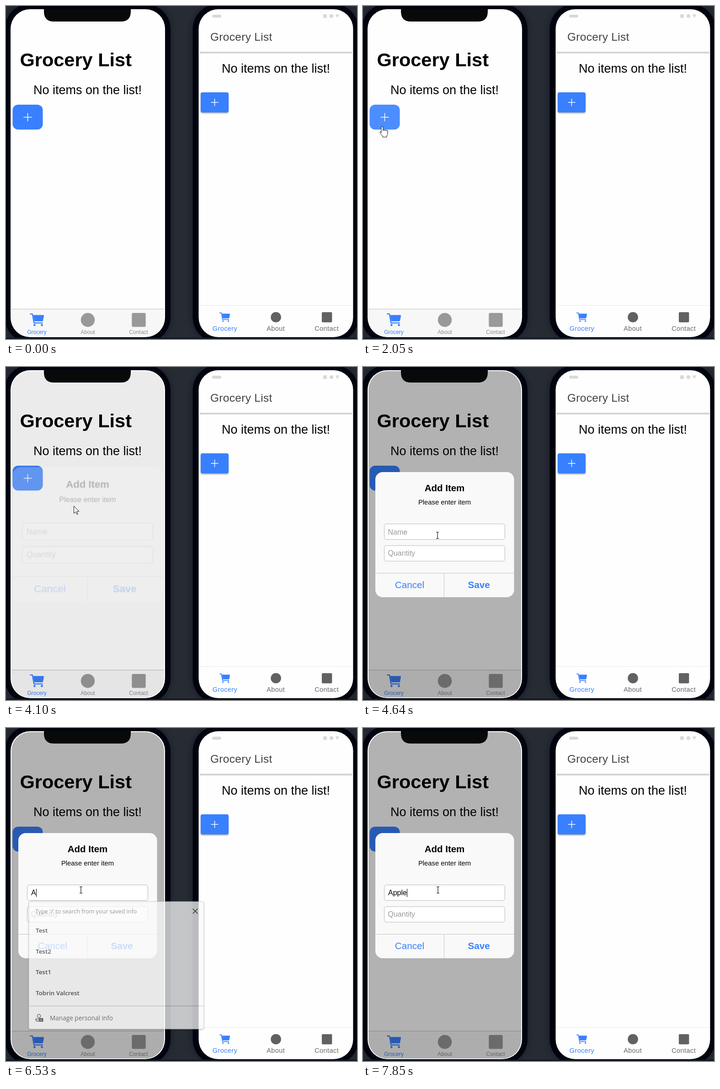
Animation of 768x729 px, one loop 8 s. Source, as an HTML page:

```html
<!DOCTYPE html>
<html lang="en">
<head>
<meta charset="utf-8">
<title>Grocery list on two phones</title>
<style>
  html, body { margin: 0; width: 100%; height: 100%; overflow: hidden; background: #262b34; }
  body { position: relative; font-family: "Liberation Sans", Arial, sans-serif; }
  svg { position: absolute; left: 0; top: 0; display: block; }
  .mid { text-anchor: middle; }
  .blue { fill: #3880ff; }
  .bold { font-weight: 700; }
  .message { font-size: 27px; text-anchor: middle; }
  .plus { stroke: #fff; stroke-width: 1.5; stroke-linecap: round; }
  .ios-tab { font-size: 12px; text-anchor: middle; }
  .md-tab { font-size: 14.5px; letter-spacing: .03em; text-anchor: middle; }
  .field { fill: #fff; stroke: #b8b8b8; }
  .hint { font-size: 16px; fill: #999; }
  .action { font-size: 20.7px; fill: #3880ff; text-anchor: middle; }
  .popup { font-family: "Open Sans", "Noto Sans", sans-serif; }
  .saved { font-size: 13.4px; font-weight: 600; fill: #303030; }

  /* One shared 8 s clock; 1% is 80 ms. */
  .anim { animation: 8s step-end infinite; }
  .hover { animation-name: hover; }
  .click { animation-name: click; }
  .backdrop { animation-name: backdrop; }
  .alert { animation-name: alert; transform-origin: 178.5px 367px; }
  .name-hint { animation-name: name-hint; }
  .popup { animation-name: popup; }
  .cursor { animation-name: cursor; }
  .arrow { animation-name: arrow; }
  .hand { animation-name: hand; }
  .beam { animation-name: beam; }

  .typed {
    position: absolute; left: 55px; top: 352px;
    font-size: 16px; line-height: 18px; color: #000;
  }
  .typed::after {
    content: ""; display: block; height: 18px; width: fit-content;
    border-right: 1px solid transparent;
    animation: type 8s step-end infinite, caret 8s step-end infinite;
  }

  @keyframes hover { 0%, 48.18% { fill: #3880ff } 23.7% { fill: #4c8dff } 100% { fill: #3880ff } }
  @keyframes click { 0%, 45.375%, 100% { opacity: 0 } 44.625% { opacity: .56 } }
  @keyframes backdrop {
    0% { opacity: 0 } 51.25% { opacity: .075 } 52.2% { opacity: .235 } 53.1%, 100% { opacity: .3 }
  }
  @keyframes alert {
    0% { opacity: 0; transform: scale(1.1) }
    51.25% { opacity: .23; transform: scale(1.08) }
    52.2% { opacity: .78; transform: scale(1.022) }
    53.1%, 100% { opacity: 1; transform: scale(1) }
  }
  @keyframes name-hint { 0% { opacity: 1 } 80.625%, 100% { opacity: 0 } }
  @keyframes popup {
    0% { opacity: 0 } 66.75% { opacity: .5 } 67.75% { opacity: 1 }
    81.625% { opacity: .75 } 82.6% { opacity: .3 } 83.5%, 100% { opacity: 0 }
  }
  @keyframes type {
    0% { content: "" } 80.625% { content: "A" } 88.375% { content: "Ap" }
    89.5% { content: "App" } 95.125% { content: "Appl" } 98.125%, 100% { content: "Apple" }
  }
  @keyframes caret {
    0%, 73.875% { border-color: transparent } 66.75%, 80.625%, 100% { border-color: #000 }
  }
  @keyframes cursor {
    0% { transform: translate(503px, 740px) }
    8% { transform: translate(503px, 715px); animation-timing-function: steps(10) }
    17.875% { transform: translate(160px, 279px); animation-timing-function: steps(8) }
    25.625% { transform: translate(42px, 264px) }
    27.5% { transform: translate(42px, 265px) }
    28.7% { transform: translate(42px, 265px); animation-timing-function: steps(3) }
    31.875% { transform: translate(53px, 240px) }
    46.125% { transform: translate(53px, 240px); animation-timing-function: steps(5) }
    51.25% { transform: translate(148px, 304px); animation-timing-function: steps(6) }
    56.875% { transform: translate(171px, 374px) }
    58% { transform: translate(163px, 368px); animation-timing-function: steps(2) }
    60.125% { transform: translate(161px, 369px) }
    60.75% { transform: translate(161px, 369px); animation-timing-function: steps(3) }
    64.125% { transform: translate(158px, 364px) }
    69.125% { transform: translate(158px, 364px); animation-timing-function: steps(2) }
    70.625%, 100% { transform: translate(164px, 354px) }
  }
  @keyframes arrow { 0%, 23.7%, 54.99%, 100% { opacity: 0 } 8%, 48.18% { opacity: 1 } }
  @keyframes hand { 0%, 48.18%, 100% { opacity: 0 } 23.7% { opacity: 1 } }
  @keyframes beam { 0% { opacity: 0 } 54.99%, 100% { opacity: 1 } }
</style>
</head>
<body>
<svg width="768" height="729" viewBox="0 0 768 729">
  <defs>
    <clipPath id="ios-app"><rect x="12" y="9" width="334" height="714.5" rx="41"/></clipPath>
    <clipPath id="md-app"><rect x="422" y="7" width="337" height="718" rx="43"/></clipPath>
    <filter id="glow" x="-10%" y="-10%" width="120%" height="120%"><feGaussianBlur stdDeviation="7"/></filter>
    <linearGradient id="fall" x2="0" y2="1">
      <stop stop-color="#000" stop-opacity=".26"/>
      <stop offset="1" stop-color="#000" stop-opacity="0"/>
    </linearGradient>
    <g id="cart">
      <path d="M48 80h64l48 272h256" fill="none" stroke="#3880ff" stroke-width="32" stroke-linecap="round" stroke-linejoin="round"/>
      <path class="blue" d="M134 112H440q25 2 22 28l-29 145q-4 19-24 19H168z"/>
      <circle class="blue" cx="176" cy="416" r="32"/>
      <circle class="blue" cx="400" cy="416" r="32"/>
    </g>
    <g id="phone">
      <rect x="-4" y="-5" width="364" height="742" rx="56" fill="#000" opacity=".35" filter="url(#glow)"/>
      <rect x="-3" y="-5" width="363" height="742" rx="56" fill="#01040f"/>
      <rect x="10" y="7" width="338" height="718" rx="43" fill="#fefefe"/>
    </g>
  </defs>

  <rect width="768" height="729" fill="#262b34"/>
  <use href="#phone"/>
  <use href="#phone" x="411.5"/>
  <rect y="726" width="768" height="3" fill="#101721"/>

  <!-- Left phone -->
  <g clip-path="url(#ios-app)">
    <text class="bold" x="30.5" y="132" font-size="41.5">Grocery List</text>
    <text class="message" x="178.5" y="193">No items on the list!</text>
    <rect class="anim hover" x="14.5" y="216" width="66" height="54.5" rx="12"/>
    <path class="plus" d="M39 243.5h17M47.5 235v17"/>
    <rect x="12" y="663" width="334" height="62" fill="#f7f7f7"/>
    <path d="M12 663.5h334" stroke="#bcbcbc"/>
    <use href="#cart" transform="translate(49.7 668.4) scale(.0721)"/>
    <circle cx="179" cy="687.3" r="15.2" fill="#999"/>
    <rect x="275.3" y="672" width="30.4" height="30.6" rx="3" fill="#999"/>
    <text class="ios-tab blue" x="67.5" y="718">Grocery</text>
    <g class="ios-tab" fill="#8c8c8c">
      <text x="179" y="718">About</text>
      <text x="290" y="718">Contact</text>
    </g>
    <rect class="anim backdrop" x="12" y="9" width="334" height="716"/>
  </g>
  <path d="M83 6h190v6q0 22-22 22H105q-22 0-22-22z" fill="#08090b"/>

  <!-- Right phone -->
  <g clip-path="url(#md-app)">
    <g fill="#d9d9d9">
      <rect x="451" y="19" width="20" height="6.6" rx="3.3"/>
      <rect x="694" y="18.2" width="8" height="8" rx="1"/>
      <circle cx="712" cy="22.2" r="4.1"/>
      <path d="M720.7 18.5h8.6l-4.3 7.7z"/>
    </g>
    <text x="447" y="76" font-size="24.5" letter-spacing=".3" fill="#424242">Grocery List</text>
    <rect x="423.5" y="100.5" width="334" height="5" fill="url(#fall)"/>
    <text class="message" x="590.5" y="145.5">No items on the list!</text>
    <rect class="blue" x="426" y="189" width="61" height="44" rx="4" style="filter: drop-shadow(0 2px 1.5px #0005)"/>
    <path class="plus" d="M449 211h15M456.5 203.5v15"/>
    <path d="M423 655.5h335" stroke="#e8e8e8"/>
    <use href="#cart" transform="translate(465.3 667.6) scale(.0535)"/>
    <circle cx="590.6" cy="681.3" r="11.3" fill="#616161"/>
    <rect x="691" y="670.2" width="22.4" height="22.2" rx="2" fill="#616161"/>
    <text class="md-tab blue" x="479" y="710.5">Grocery</text>
    <g class="md-tab" fill="#666">
      <text x="590.2" y="710.5">About</text>
      <text x="701.7" y="710.5">Contact</text>
    </g>
  </g>

  <!-- Add Item dialog -->
  <g class="anim alert">
    <rect x="27" y="230" width="303.5" height="274" rx="16" fill="#f9f9f9"/>
    <text class="mid bold" x="178.5" y="272" font-size="20.5">Add Item</text>
    <text class="mid" x="178.5" y="301" font-size="14.8">Please enter item</text>
    <rect class="field" x="46.5" y="343.5" width="264" height="34" rx="4.5"/>
    <rect class="field" x="46.5" y="391" width="264" height="34" rx="4.5"/>
    <text class="hint anim name-hint" x="54.5" y="366.5">Name</text>
    <text class="hint" x="54.5" y="413">Quantity</text>
    <path d="M27 451.5h303.5M177.5 451.5V504" stroke="#c4c4c4"/>
    <text class="action" x="102" y="484">Cancel</text>
    <text class="action bold" x="253.7" y="484">Save</text>
  </g>

  <!-- Saved-info list -->
  <g class="anim popup">
    <rect x="50" y="380" width="382.5" height="279" rx="3" fill="#fafafa" stroke="#c8c8c8" style="filter: drop-shadow(0 1px 1.5px #0005)"/>
    <text x="64" y="406" font-size="12.5" fill="#767676">Type '/' to search from your saved info</text>
    <path d="M408.7 395.7l10.6 10.6m0-10.6l-10.6 10.6" stroke="#333" stroke-width="1.3"/>
    <text class="saved" x="65" y="448">Test</text>
    <text class="saved" x="65" y="494">Test2</text>
    <text class="saved" x="65" y="539">Test1</text>
    <text class="saved" x="65" y="585">Tobrin Valcrest</text>
    <path d="M50 608.5h382" stroke="#c8c8c8" stroke-width="1.5"/>
    <g fill="none" stroke="#444" stroke-width="1.4">
      <circle cx="72" cy="630.5" r="3.6"/>
      <path d="M71 642h-3q-3-1-3-5h6"/>
      <rect x="72.2" y="635.7" width="8.6" height="6.6" rx="1" fill="#444"/>
      <path d="M74 638h5M74 640.3h5" stroke="#ddd" stroke-width=".9"/>
    </g>
    <text x="96" y="640" font-size="13.6" fill="#555">Manage personal info</text>
  </g>

  <!-- Pointer -->
  <circle class="anim click" cx="53.3" cy="240.7" r="14.5" fill="#f4f01c"/>
  <g class="anim cursor" stroke="#111" stroke-linejoin="round">
    <path class="anim arrow" fill="#fff" d="M.5.5v16l4-3.6 2.6 6 2.4-1-2.6-5.8h5z"/>
    <path class="anim hand" fill="#fff" d="M-2 2q0-2 2-2t2 2v7q0-2 2-2t2 2q0-1.5 2-1.5t2 2q0-1 1-1t1 1.5v5q0 3-2 5v3h-9v-2q-3-3-6-8q0-2 2-2l1 2z"/>
    <path class="anim beam" fill="none" stroke-width="1.2" d="M-3-6.5h2.5l.5 .5l.5-.5H3M0-6V7M-3 7.5h2.5L0 7l.5 .5H3"/>
  </g>
</svg>
<div class="typed"></div>
</body>
</html>
```
